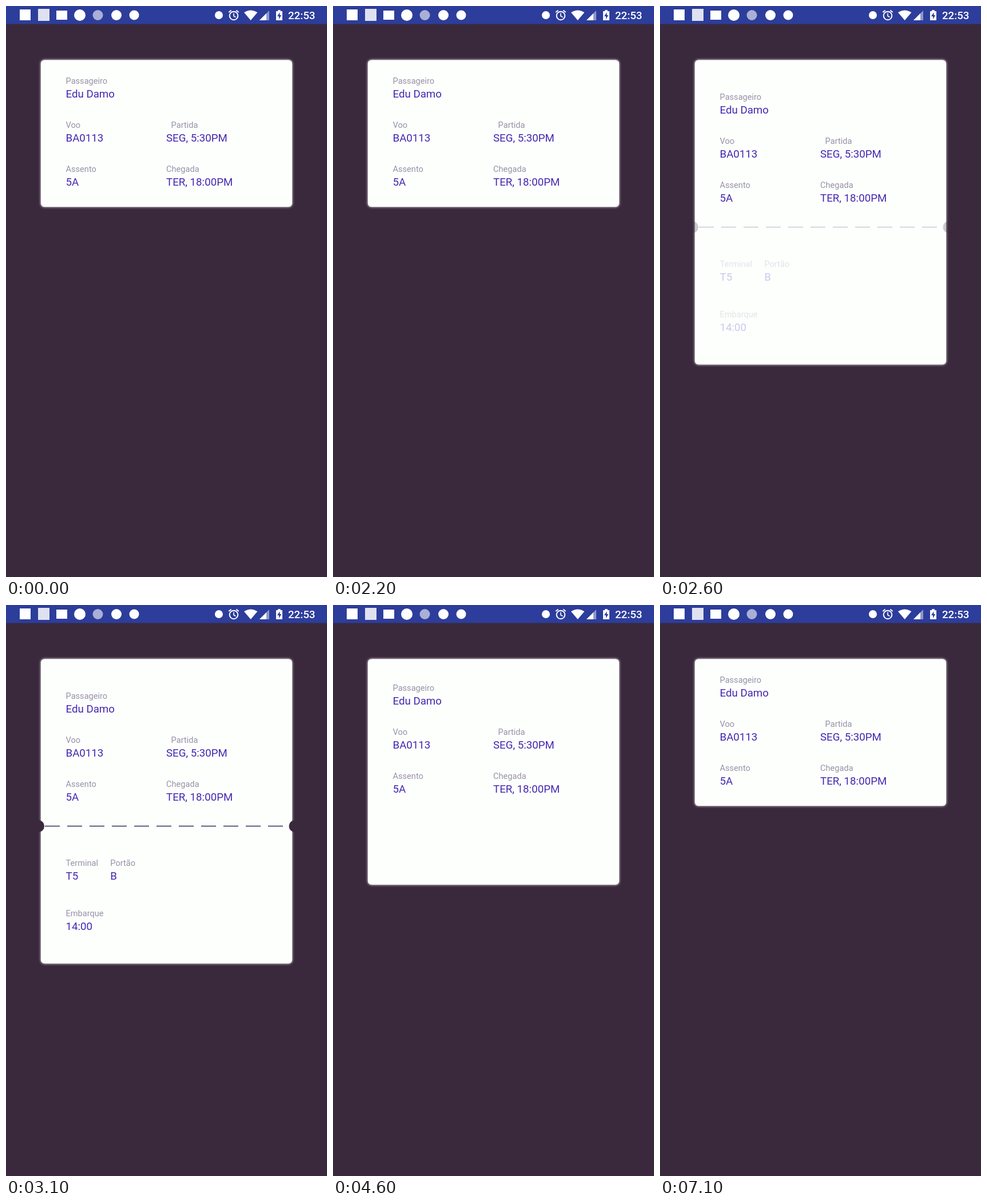
Animation of 561 by 998 pixels, one loop 7200 ms. Source, as an HTML page:

```html
<!DOCTYPE html>
<html lang="pt">
<head>
<meta charset="utf-8">
<title>Cartão de embarque</title>
<style>
  html, body { margin: 0; width: 100%; height: 100%; overflow: hidden; background: #3a293c; }
  svg { display: block; width: 561px; height: 998px; font-family: Roboto, sans-serif; }
  .label { font-size: 14.6px; fill: #9891a6; }
  .value { font-size: 18.7px; fill: #4527af; }
  .clock { font-size: 18.7px; font-weight: 500; fill: #fff; }
  #card { fill: #fdfffd; filter: drop-shadow(0 0 2px #fff); }
</style>
</head>
<body>
<svg viewBox="0 0 561 998">
  <rect width="561" height="998" fill="#3a293c"/>
  <rect width="561" height="31.5" fill="#2d3d9b"/>

  <!-- Notifications -->
  <g fill="#fff">
    <rect x="24" y="6" width="19" height="19"/>
    <rect x="56" y="5" width="20" height="21" fill="#dfe1f0"/>
    <rect x="88" y="8" width="19" height="16"/>
    <circle cx="129" cy="16" r="10"/>
    <circle cx="160.5" cy="16" r="9" fill="#a9afd6"/>
    <circle cx="193" cy="16" r="9"/>
    <circle cx="224" cy="16" r="8.5"/>
    <circle cx="372" cy="16" r="7"/>
  </g>

  <!-- System status -->
  <g fill="none" stroke="#fff" stroke-width="2">
    <circle cx="398" cy="17" r="7.3"/>
    <path d="M398 12.5V17.5L401.5 19.5" stroke-width="1.6"/>
    <path d="M389.3 11L393.6 7.4M406.7 11L402.4 7.4"/>
  </g>
  <path d="M416 11.3Q427.7 3.5 439.4 11.3L427.7 25Z" fill="#fff"/>
  <path d="M443 25L460 8V25Z" fill="#8f98cb"/>
  <path d="M443 25L455 13V25Z" fill="#fff"/>
  <path d="M472 9H475.3V7H479.7V9H483V25H472Z" fill="#fff"/>
  <path d="M478.5 11L474 18H477V23L481.3 16H478.5Z" fill="#2d3d9b"/>
  <text class="clock" x="493" y="23.4">22:53</text>

  <rect id="card" x="61" y="94.5" width="439" height="256.5" rx="6"/>
  <g id="summary"></g>
  <g id="details">
    <path d="M68 386.5H484" stroke="#3b2a56" stroke-width="1.7" stroke-dasharray="26 13"/>
    <circle cx="56.5" cy="386.5" r="10.5" fill="#3a293c"/>
    <circle cx="505" cy="386.5" r="10.5" fill="#3a293c"/>
  </g>
</svg>
<script>
const LOOP = 7200, STEP = 100, DURATION = 300;
const OPEN_GROW = 2200, OPEN_FADE = 2500, CLOSE_FADE = 4150, CLOSE_SHRINK = 4450;
const CLOSED_HEIGHT = 256.5, GROWTH = 275.5, TEXT_SHIFT = 27.6;

const card = document.getElementById('card');
const summary = document.getElementById('summary');
const details = document.getElementById('details');

function addText(parent, className, x, y, content) {
  const text = document.createElementNS(parent.namespaceURI, 'text');
  text.setAttribute('class', className);
  text.setAttribute('x', x);
  text.setAttribute('y', y);
  text.textContent = content;
  parent.append(text);
}

function addField(parent, x, y, label, value, labelIndent = 0) {
  addText(parent, 'label', x + labelIndent, y, label);
  addText(parent, 'value', x, y + 24, value);
}

addField(summary, 104.5, 136, 'Passageiro', 'Edu Damo');
addField(summary, 104.5, 213, 'Voo', 'BA0113');
addField(summary, 280, 213, 'Partida', 'SEG, 5:30PM', 8.6);
addField(summary, 104.5, 290, 'Assento', '5A');
addField(summary, 280, 290, 'Chegada', 'TER, 18:00PM');
addField(details, 104.5, 456, 'Terminal', 'T5');
addField(details, 182.3, 456, 'Portão', 'B');
addField(details, 104.5, 544, 'Embarque', '14:00');

function ease(time, start) {
  const progress = Math.min(1, Math.max(0, (time - start) / DURATION));
  return (1 - Math.cos(Math.PI * progress)) / 2;
}

function draw(now) {
  const time = Math.floor((now % LOOP) / STEP) * STEP;
  const expanded = ease(time, OPEN_GROW) - ease(time, CLOSE_SHRINK);
  const visible = ease(time, OPEN_FADE) - ease(time, CLOSE_FADE);
  card.setAttribute('height', CLOSED_HEIGHT + GROWTH * expanded);
  summary.setAttribute('transform', `translate(0 ${TEXT_SHIFT * expanded})`);
  details.setAttribute('opacity', visible);
}

const startTime = performance.now();
function tick() {
  draw(performance.now() - startTime);
  requestAnimationFrame(tick);
}
tick();
</script>
</body>
</html>
```
